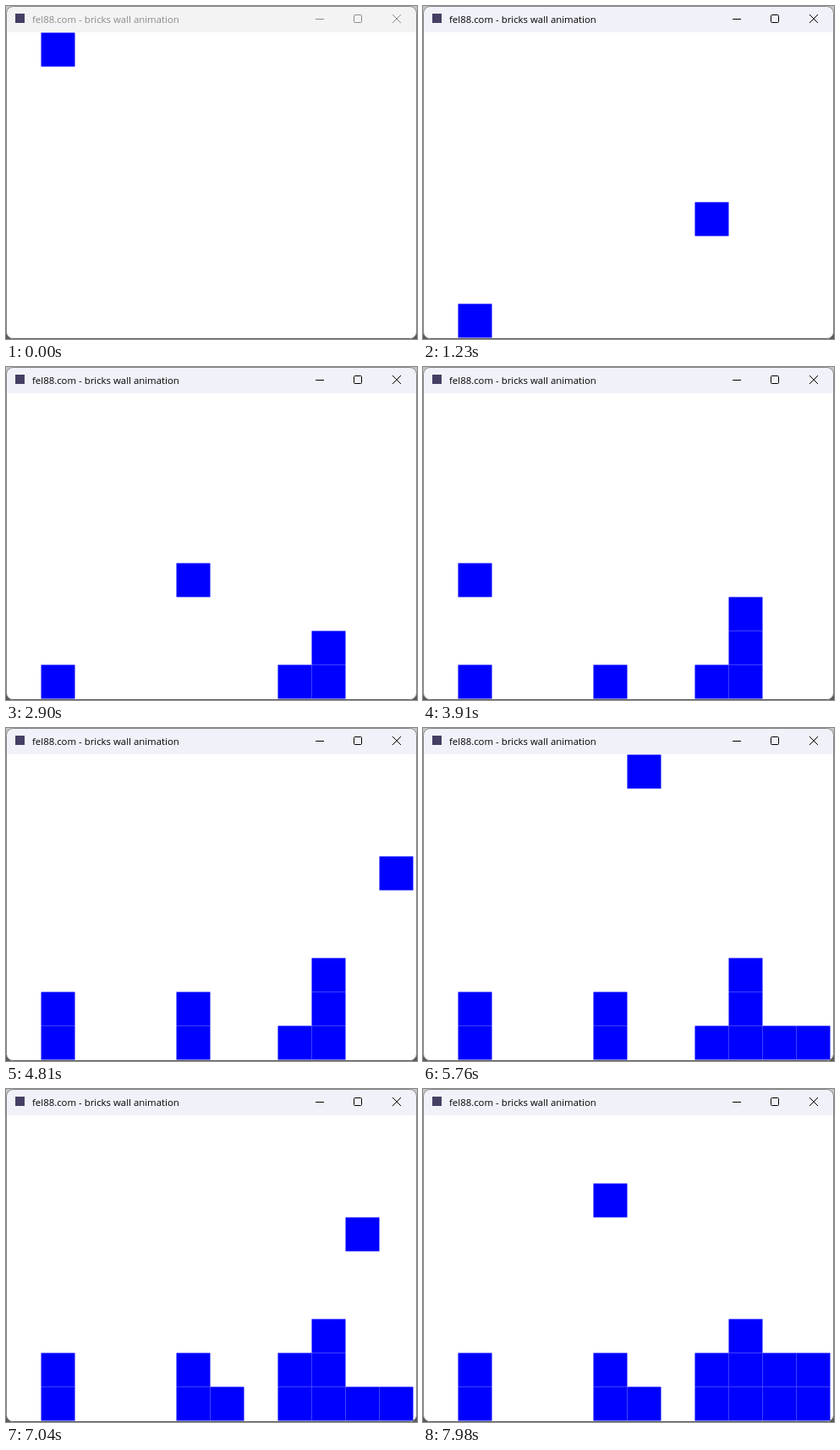
An HTML page with a canvas for the animation above (8000 ms loop, 486x393 px).

```html
<!DOCTYPE html>
<html lang="en">
<head>
<meta charset="utf-8">
<title>Bricks wall animation</title>
<style>
  html, body { margin: 0; width: 100%; height: 100%; overflow: hidden; }
  canvas { display: block; width: 486px; height: 393px; }
</style>
</head>
<body>
<canvas id="stage" width="486" height="393"></canvas>
<script>
const W = 486, H = 393, LOOP = 8000;
const CELL = 40, LEFT = 1, TOP = 31, ROWS = 9;
const FIRST_TICK = 340, TICK = 63.5;
const FADE_START = 150, FADE_TIME = 270;
const ctx = document.getElementById('stage').getContext('2d');

// Column of each brick, in falling order
const drops = [1, 8, 9, 9, 5, 9, 1, 5, 11, 10, 6, 8, 10, 11, 5];

const clamp01 = v => Math.min(1, Math.max(0, v));

function mix(a, b, k) {
  return `rgb(${a.map((v, i) => Math.round(v + (b[i] - v) * k)).join(',')})`;
}

function line(x0, y0, x1, y1) {
  ctx.beginPath();
  ctx.moveTo(x0, y0);
  ctx.lineTo(x1, y1);
  ctx.stroke();
}

function roundBox(x, y, w, h, r) {
  ctx.beginPath();
  ctx.roundRect(x, y, w, h, r);
}

// The half-pixel offset gives the soft edges and pale seams
function drawBrick(col, row) {
  ctx.fillStyle = '#00f';
  ctx.fillRect(LEFT + col * CELL + 0.5, TOP + row * CELL + 0.5, CELL, CELL);
}

// Each brick falls one row per tick; the next appears a tick after it lands
function drawBricks(tick) {
  const height = {};
  for (const col of drops) {
    const stacked = height[col] || 0;
    const floor = ROWS - 1 - stacked;
    drawBrick(col, Math.min(tick, floor));
    if (tick <= floor) return;
    tick -= floor + 1;
    height[col] = stacked + 1;
  }
}

function drawTitleBar(focus) {
  ctx.fillStyle = mix([243, 243, 243], [241, 242, 249], focus);
  ctx.fillRect(0, 0, W, TOP);

  ctx.fillStyle = '#453f63';
  ctx.fillRect(11, 9, 11, 11);

  const ink = mix([138, 138, 138], [0, 0, 0], focus);
  ctx.fillStyle = ink;
  ctx.font = '11.4px "Open Sans", "Noto Sans", sans-serif';
  ctx.fillText('fel88.com - bricks wall animation', 31, 20);

  ctx.strokeStyle = ink;
  ctx.lineWidth = 1;
  line(366, 15.5, 376, 15.5);
  roundBox(411.5, 10.5, 9, 9, 1);
  ctx.stroke();
  line(457, 10, 467, 20);
  line(467, 10, 457, 20);
}

function draw(ms) {
  ctx.fillStyle = '#c4c4c4';
  ctx.fillRect(0, 0, W, 303);
  ctx.fillStyle = '#5a5a5a';
  ctx.fillRect(0, 303, W, H - 303);

  ctx.save();
  roundBox(0.5, 0.5, W - 1, H - 1, 8);
  ctx.clip();
  ctx.fillStyle = '#fff';
  ctx.fillRect(0, 0, W, H);
  drawTitleBar(clamp01((ms - FADE_START) / FADE_TIME));
  drawBricks(Math.max(0, Math.floor((ms - FIRST_TICK) / TICK)));
  ctx.restore();

  roundBox(0.5, 0.5, W - 1, H - 1, 8);
  ctx.strokeStyle = '#858585';
  ctx.lineWidth = 1;
  ctx.stroke();
  ctx.strokeStyle = '#606060';
  line(8, H - 0.5, W - 8, H - 0.5);
}

const start = performance.now();
function loop() {
  draw((performance.now() - start) % LOOP);
  requestAnimationFrame(loop);
}
loop();
</script>
</body>
</html>
```
